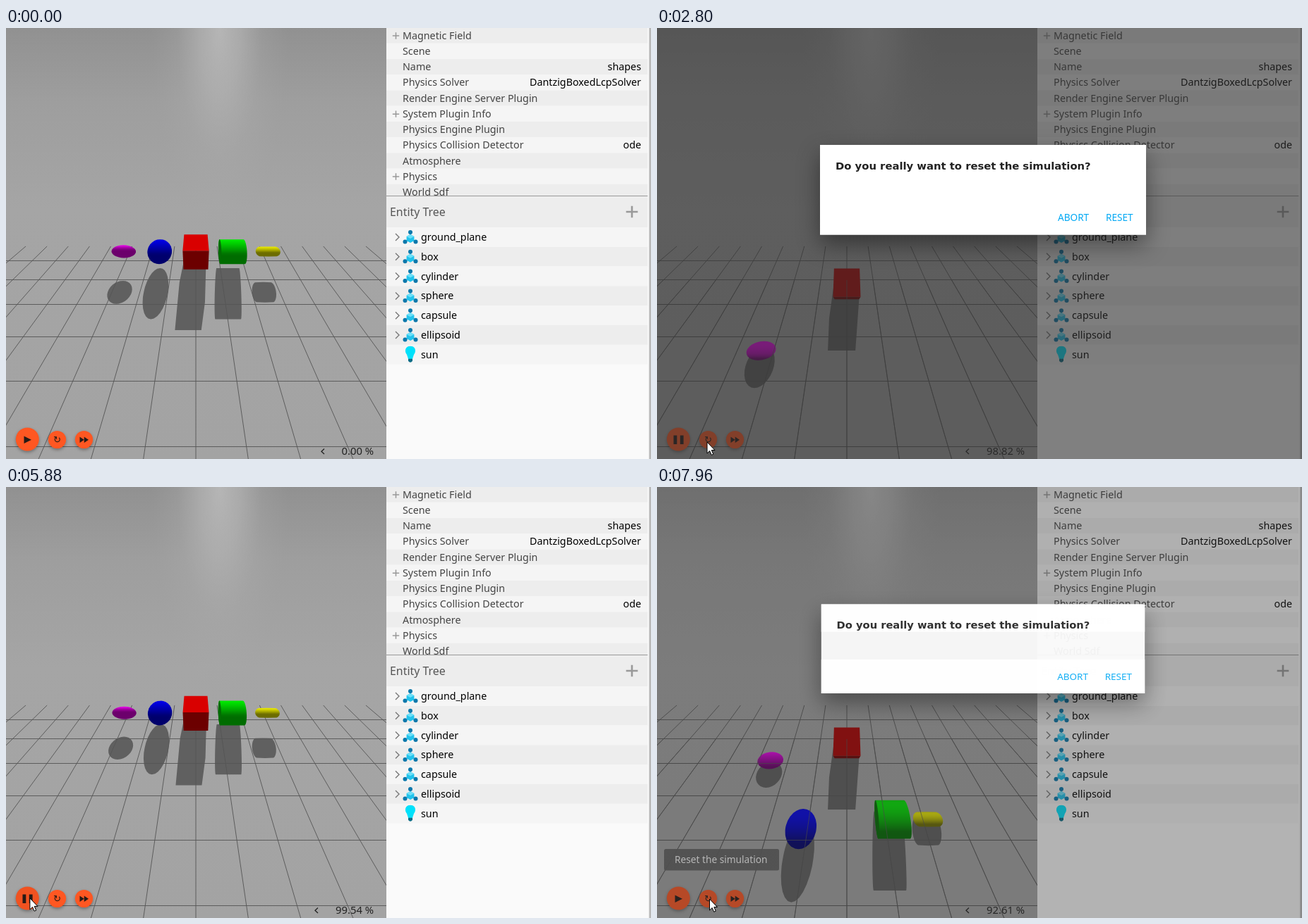
Recreate the animation shown at these times as an HTML page. Size 914x612 px, loop 8 s.

```html
<!DOCTYPE html>
<html lang="en">
<head>
<meta charset="utf-8">
<title>Simulation reset</title>
<style>
html, body { margin: 0; width: 100%; height: 100%; overflow: hidden; background: #fafafa; }
svg { display: block; width: 100vw; height: 100vh; }
text { font: 14.3px "Noto Sans", "Open Sans", sans-serif; fill: #444; white-space: pre; }
.value { fill: #000; }
.end { text-anchor: end; }
.head { font-size: 15.9px; fill: #555; }
.rate { font-size: 14.8px; fill: #222; }
.tip { font-size: 13.7px; fill: #fff; }
.title { font: bold 14.8px "DejaVu Sans", sans-serif; fill: #222; }
.action { font-size: 13.6px; fill: #03a9f4; }
.glyph { font: 13px "DejaVu Sans", sans-serif; fill: #261a16; text-anchor: middle; }
.raised { filter: drop-shadow(0 2px 2px rgba(0,0,0,.32)); }
#sheet { filter: drop-shadow(0 14px 16px rgba(0,0,0,.42)); }
</style>
</head>
<body>
<svg viewBox="0 0 914 612" preserveAspectRatio="none">
  <defs>
    <linearGradient id="ground" x2="0" y2="1">
      <stop offset="0" stop-color="#919191"/><stop offset=".17" stop-color="#9e9e9e"/>
      <stop offset=".42" stop-color="#a5a5a5"/><stop offset="1" stop-color="#a3a3a3"/>
    </linearGradient>
    <radialGradient id="glow">
      <stop offset="0" stop-color="#bcbcbc"/><stop offset=".5" stop-color="#b2b2b2" stop-opacity=".75"/>
      <stop offset="1" stop-color="#a8a8a8" stop-opacity="0"/>
    </radialGradient>
    <clipPath id="sunk"><rect y="358" width="539" height="254"/></clipPath>
    <path id="lines" fill="none" stroke="#555" stroke-width=".9"/>
  </defs>
  <rect width="539" height="612" fill="url(#ground)"/>
  <ellipse cx="303" cy="0" rx="98" ry="290" fill="url(#glow)" opacity=".4"/>
  <ellipse cx="303" cy="0" rx="60" ry="192" fill="url(#glow)" opacity=".75"/>
  <path id="shadows" fill="#606060"/>
  <use href="#lines"/>
  <g id="bodies"></g>
  <use id="over" href="#lines" clip-path="url(#sunk)"/>
  <g id="buttons"></g>
  <path id="chevron" d="M451 597.5L447 601.2L451 605" fill="none" stroke="#222" stroke-width="1.3"/>
  <text id="rate" class="rate end" y="606"></text>
  <g id="tooltip">
    <rect id="tipBox" x="10" height="30.5" rx="2.5" fill="#616161" fill-opacity=".93"/>
    <text id="tipText" class="tip" x="25"></text>
  </g>
  <g id="panel"></g>
  <rect id="dim" width="914" height="612" fill="#303030"/>
  <g id="dialog">
    <rect id="sheet" class="part" x="231" y="166" width="462" height="127.5" fill="#fff"/>
    <rect class="part" x="231" y="166" width="462" height="39.5" fill="#fff"/>
    <rect class="part" x="231" y="245" width="462" height="48.5" fill="#fff"/>
    <rect id="hover" x="628" y="251" width="58" height="36" rx="2"/>
    <text class="title part" x="253" y="201">Do you really want to reset the simulation?</text>
    <text class="action part" x="568" y="274">ABORT</text>
    <text class="action part" x="636" y="274">RESET</text>
  </g>
  <path id="cursor" d="M0 0V16L3.7 12.5L6.2 18.3L8.8 17.2L6.3 11.5H11Z" fill="#fff" stroke="#000"/>
</svg>
<script>
const LOOP = 8000;
const RUNS = [
  { shown: 640, start: 700, end: 4320, speed: .98, rate: n => 98.9 - 1.118 * Math.exp(-.5275 * n) },
  { shown: 5640, start: 5705, end: LOOP, stop: 7280, speed: .93, rate: n => 99.54 - 1.737 * Math.min(n, 5) ** .86 }
];
const PAUSE = 7320;
const DIALOGS = [[2420, 4343], [7873, Infinity]];
const { sin, cos, sqrt, min, max, PI } = Math;
const $ = id => document.getElementById(id);
const set = (el, attrs) => { for (const k in attrs) el.setAttribute(k, attrs[k]); };
const clamp = v => min(1, max(0, v));
const mix = (a, b, q) => a.map((v, i) => v + (b[i] - v) * q);
const smooth = q => q * q * (3 - 2 * q);
const range = n => Array.from({ length: n }, (_, i) => i);

// World in metres: [away from camera, right, up]. The ground slopes down towards the camera.
const G = 9.8, TILT = PI / 6, PITCH = .5, FOCAL = 269, EYE = 6;
const NORMAL = [-sin(TILT), 0, cos(TILT)], FOOT = [6, 0, -.5];
const SUN = [.5, .1, .9];
const dot = (a, b) => a[0] * b[0] + a[1] * b[1] + a[2] * b[2];
const sub = (a, b) => a.map((v, i) => v - b[i]);

function project([x, y, z]) {
  const h = EYE - z, depth = cos(PITCH) * x + sin(PITCH) * h;
  return [FOCAL + FOCAL * y / depth, 251 + FOCAL * (cos(PITCH) * h - sin(PITCH) * x) / depth];
}

function castShadow(p) {
  const s = dot(sub(p, FOOT), NORMAL) / dot(SUN, NORMAL);
  return p.map((v, i) => v - SUN[i] * s);
}

function hull(points) {
  const turn = (a, b, c) => (b[0] - a[0]) * (c[1] - a[1]) - (b[1] - a[1]) * (c[0] - a[0]);
  const chain = list => list.reduce((out, p) => {
    while (out.length > 1 && turn(out.at(-2), out.at(-1), p) <= 0) out.pop();
    return [...out, p];
  }, []).slice(0, -1);
  const sorted = points.slice().sort((a, b) => a[0] - b[0] || a[1] - b[1]);
  return [...chain(sorted), ...chain(sorted.reverse())];
}
const outline = points => 'M' + hull(points).map(p => p.map(v => v.toFixed(2)).join(' ')).join('L') + 'Z';

// Bodies of revolution: rings of [offset along the axis, share of the radius].
const arc = range(15).map(i => (i / 14 - .5) * PI);
const dome = (half, gap = 0) => arc.map(a => [half * sin(a) + gap * Math.sign(a), cos(a)]);
const BODIES = [
  { id: 'ellipsoid', y: -3, hue: [1, 0, 1], rings: dome(.5), rx: .2, rz: .3, rest: .28, grip: .3, drift: 0 },
  { id: 'sphere', y: -1.5, hue: [0, 0, 1], rings: dome(.5), rx: .5, rz: .5, rest: .5, grip: 5 / 7, drift: 0 },
  { id: 'box', y: 0, hue: [1, 0, 0] },
  { id: 'cylinder', y: 1.5, hue: [0, 1, 0], rings: [[-.5, 1], [.5, 1]], rx: .5, rz: .5, rest: .5, grip: 2 / 3, drift: 0, flat: true },
  { id: 'capsule', y: 3, hue: [1, 1, 0], rings: dome(.2, .3), rx: .2, rz: .2, rest: .2, grip: 2 / 3, drift: -.18 }
];
const FACES = {
  top: [[.5, .5, .5], [.5, -.5, .5], [-.5, .5, .5], [-.5, -.5, .5]],
  front: [[-.5, .5, .5], [-.5, -.5, .5], [-.5, .5, -.5], [-.5, -.5, -.5]],
  back: [[.5, .5, .5], [.5, -.5, .5], [.5, .5, -.5], [.5, -.5, -.5]]
};

// Free fall on to the slope, then rolling without slipping.
function roll(b, t) {
  const limit = (cos(TILT) - b.rest) / cos(TILT), hit = sqrt(2 * limit / G);
  const T = max(0, t - hit), pull = G * b.grip * sin(TILT);
  const d = min(7.5, pull * hit * T + pull * T * T / 2);
  const z = .5 - min(limit, G * t * t / 2) - d * sin(TILT);
  return { at: [6 - d * cos(TILT), b.y + b.drift * T, z], spin: d / b.rest };
}

// The box lands on its rear edge, tips on to the slope and slides to a halt.
function tip(t) {
  const hit = .207, q = clamp((t - hit) / .75);
  const z = .5 - G * min(t, hit) ** 2 / 2;
  return { at: mix([6, 0, z], [5.127, 0, -.427], q ** 1.4), spin: TILT * (1 - (1 - q) ** 2) };
}

const rotate = ([x, y, z], a) => [x * cos(a) - z * sin(a), y, x * sin(a) + z * cos(a)];
const place = (p, { at, spin }) => rotate(p, spin).map((v, i) => v + at[i]);

function tone(hue, normal) {
  const lit = max(0, dot(normal, SUN)) / sqrt(dot(SUN, SUN) * dot(normal, normal));
  return `rgb(${hue.map(c => Math.round(c * (108 + 125 * lit)))})`;
}

function ring(b, offset = 0, share = 1, n = 32) {
  return range(n).map(i => 2 * PI * i / n).map(a => [b.rx * share * cos(a), offset, b.rz * share * sin(a)]);
}

// Light along the visible half of the middle ring becomes a vertical gradient.
function shading(b, pose) {
  const seen = ring(b).map(p => {
    const at = place(p, pose), normal = rotate([p[0] / b.rx ** 2, 0, p[2] / b.rz ** 2], pose.spin);
    return { y: project(at)[1], color: tone(b.hue, normal), facing: dot(normal, sub([0, at[1], EYE], at)) };
  }).filter(s => s.facing > 0).sort((m, n) => m.y - n.y);
  const y1 = seen[0].y, y2 = seen.at(-1).y;
  const stops = seen.map(s => `<stop offset="${(s.y - y1) / (y2 - y1)}" stop-color="${s.color}"/>`);
  return `<linearGradient id="${b.id}" gradientUnits="userSpaceOnUse" x1="0" x2="0" y1="${y1}" y2="${y2}">${stops.join('')}</linearGradient>`;
}

function drawScene(t) {
  let shadows = '', bodies = '';
  const paint = (points, fill) => { bodies += `<path d="${outline(points.map(project))}" fill="${fill}"/>`; };
  for (const b of BODIES) {
    const pose = b.rings ? roll(b, t) : tip(t), put = p => place(p, pose);
    const points = (b.rings ? b.rings.flatMap(([o, s]) => ring(b, o, s)) : Object.values(FACES).flat()).map(put);
    shadows += outline(points.map(p => project(castShadow(p))));
    if (b.rings) {
      bodies += shading(b, pose);
      paint(points, `url(#${b.id})`);
      if (b.flat) paint(ring(b, -.5).map(put), tone(b.hue, [0, -1, 0]));
    } else {
      paint(FACES.front.map(put), tone(b.hue, rotate([-1, 0, 0], pose.spin)));
      paint(FACES.top.map(put), tone(b.hue, rotate([0, 0, 1], pose.spin)));
    }
  }
  set($('shadows'), { d: shadows });
  $('bodies').innerHTML = bodies;
  set($('over'), { opacity: t > .5 ? .75 : 0 });
}

function gridPath() {
  const reach = 6.9, near = .83;
  let d = '';
  for (let k = -10; k <= 10; k++) d += `M${project([reach, k, 0])}L${project([near, k, 0])}`;
  // The grid lies at the height of the drawn horizon rows, one metre apart.
  for (let m = 1; m <= 6; m++) d += `M0 ${Math.round(project([m, 0, 0])[1]) + .5}H539`;
  return d;
}

const plus = (x, y, r, w) => `<path d="M${x - r} ${y}H${x + r}M${x} ${y - r}V${y + r}" stroke="#999" stroke-width="${w}"/>`;
const label = (x, y, str, cls = '') => `<text x="${x}" y="${y}" class="${cls}">${str}</text>`;
const band = (y, h, i) => `<rect x="539" y="${y}" width="370.5" height="${h}" fill="${i % 2 ? '#f5f5f5' : '#ededed'}"/>`;

function modelIcon(y) {
  const ends = [[573, y - 7], [565.5, y + 6.5], [580.5, y + 6.5]];
  return ends.map(([x, v]) => `<path d="M573 ${y + 2}L${x} ${v}" stroke="#0b78ab" stroke-width="1.6"/><circle cx="${x}" cy="${v}" r="3" fill="#0b78ab"/>`).join('') +
    `<path d="M573 ${y - 4}L578.4 ${y - 1}V${y + 5}L573 ${y + 8}L567.6 ${y + 5}V${y - 1}Z" fill="#22c3ec"/>` +
    `<path d="M573 ${y - 4}L578.4 ${y - 1}L573 ${y + 2}L567.6 ${y - 1}Z" fill="#6fe0f8"/>`;
}

const bulbIcon = y => `<path d="M570 ${y + 4}H576V${y + 9}Q573 ${y + 13} 570 ${y + 9}Z" fill="#0a6c86"/>` +
  `<path d="M573 ${y - 12}C581 ${y - 12} 581.5 ${y - 4} 578 ${y}L576 ${y + 6}H570L568 ${y}C564.5 ${y - 4} 565 ${y - 12} 573 ${y - 12}Z" fill="#00e1fb"/>`;

function panel() {
  const rows = ['+Magnetic Field', 'Scene', 'Name|shapes', 'Physics Solver|DantzigBoxedLcpSolver',
    'Render Engine Server Plugin', '+System Plugin Info', 'Physics Engine Plugin',
    'Physics Collision Detector|ode', 'Atmosphere', '+Physics', 'World Sdf'];
  const items = ['ground_plane', 'box', 'cylinder', 'sphere', 'capsule', 'ellipsoid', 'sun'];
  let out = '<rect x="539" width="375" height="612" fill="#fafafa"/>';
  rows.forEach((row, i) => {
    const y = 10.7 + i * 22.23, [name, value] = row.replace('+', '').split('|');
    out += band(y - 11.1, 22.23, i) + label(562, y + 5, name);
    if (row[0] === '+') out += plus(552.5, y + .3, 4.7, 1.5);
    if (value) out += label(900, y + 5, value, 'value end');
  });
  out += band(238, 45, 0) + '<path d="M539 238.5H909.5" stroke="#999"/>' +
    label(544, 267, 'Entity Tree', 'head') + plus(887, 261, 8.3, 2.6);
  items.forEach((name, i) => {
    const y = 297 + i * 27.8;
    out += band(y - 14, 27.8, i + 1) + label(588, y + 5, name, 'value');
    out += name === 'sun' ? bulbIcon(y)
      : modelIcon(y) + `<path d="M552 ${y - 5}L557 ${y}L552 ${y + 5}" fill="none" stroke="#777" stroke-width="1.4"/>`;
  });
  return out + '<rect x="909.5" width="1.8" height="612" fill="#f8f8f8"/><rect x="911.3" width="2.7" height="612" fill="#b9b9b9"/>';
}

const ICONS = {
  play: 'M25.5 579.5L36 584.7L25.5 590Z',
  pause: 'M23.5 578.5H28.3V591H23.5ZM32.8 578.5H37.6V591H32.8Z',
  skip: 'M104.5 580.5L110.7 584.7L104.5 589ZM110.7 580.5L117 584.7L110.7 589Z'
};
const BUTTONS = [[30.3, 584, 16.5], [72.5, 584.5, 12.6], [110.5, 584.5, 12.6]];

function drawButtons(T, playing, cursor) {
  const press = T >= 320 && T < 640 ? .06 * clamp((T - 280) / 120) : 0;
  const modal = DIALOGS.some(([a, b]) => T >= a && T < b);
  $('buttons').innerHTML = BUTTONS.map(([x, y, r], i) => {
    const over = cursor && !modal && Math.hypot(cursor[0] - x, cursor[1] - y) < r;
    const tint = over ? .06 : i ? 0 : press;
    return `<circle class="raised" cx="${x}" cy="${y}" r="${r}" fill="#ff5722"/><circle cx="${x}" cy="${y}" r="${r}" opacity="${tint}"/>`;
  }).join('') + `<path d="${playing ? ICONS.pause : ICONS.play}${ICONS.skip}" fill="#261a16"/>` +
    label(72.5, 589, '↻', 'glyph');
}

function drawRate(T, run) {
  const age = run ? T - run.shown : 0;
  const rate = run ? run.rate(Math.floor(age / 400)) : 0;
  // The row re-centres one tick after the wider number arrives.
  const late = run && age < 40;
  $('rate').textContent = rate.toFixed(2) + ' %';
  set($('rate'), { x: late ? 530 : 521 });
  set($('chevron'), { transform: `translate(${run && !late ? -9 : 0} 0)` });
}

const TRACK = [[1880, 112, 616], [2200, 71, 588], [2960, 71, 588], [3600, 716, 237], [3880, 667, 270],
  [4690, 667, 270], [5000, 190, 571], [5230, 190, 571], [5400, 2, 594], [5520, 34, 584], [7320, 33, 583], [7560, 74.5, 585]];

function cursorAt(T) {
  const i = TRACK.findIndex(k => k[0] > T);
  if (i === 0) return null;
  if (i < 0) return TRACK.at(-1).slice(1);
  const a = TRACK[i - 1], b = TRACK[i];
  return mix(a, b, smooth((T - a[0]) / (b[0] - a[0]))).slice(1);
}

function drawTooltip(T) {
  const reset = T >= 7600, fade = (a, b) => clamp((T - a) / 120) * clamp((b - T) / 120);
  const y = reset ? 514 : 509.3;
  $('tipText').textContent = reset ? 'Reset the simulation' : 'Pause the simulation';
  set($('tipText'), { y: y + 19.5 });
  set($('tipBox'), { y, width: reset ? 163 : 165 });
  set($('tooltip'), { opacity: reset ? fade(7660, 9000) : fade(6560, 7440) });
}

function drawDialog(T) {
  const span = DIALOGS.find(([a, b]) => T >= a && T < b + 220);
  let scale = 1, alpha = 0, dim = 0;
  if (span) {
    const closing = T >= span[1], age = T - span[closing ? 1 : 0];
    const left = 1 - clamp(age / 150), zoom = .1 * (1 - clamp(age / 220)) ** 5;
    scale = closing ? .9 + zoom : 1 - zoom;
    alpha = closing ? left ** 3 : 1 - left ** 3;
    dim = .6 * (closing ? left : 1 - left);
  }
  set($('dim'), { opacity: dim });
  set($('dialog'), {
    transform: `translate(462 229.75) scale(${scale}) translate(-462 -229.75)`,
    visibility: alpha > 0 ? 'visible' : 'hidden'
  });
  document.querySelectorAll('.part').forEach(el => set(el, { opacity: alpha }));
  set($('hover'), { opacity: T > 3840 && T < 4600 ? alpha * (T < 4080 ? .05 : .12) : 0 });
}

function render(T) {
  const run = RUNS.find(r => T >= r.shown && T < r.end);
  const t = run ? max(0, min(T, run.stop || LOOP) - run.start) / 1000 * run.speed : 0;
  const cursor = cursorAt(T);
  drawScene(t);
  drawButtons(T, run && T < PAUSE, cursor);
  drawRate(T, run);
  drawTooltip(T);
  drawDialog(T);
  set($('cursor'), cursor
    ? { transform: `translate(${cursor})`, visibility: 'visible' }
    : { visibility: 'hidden' });
}

set($('lines'), { d: gridPath() });
$('panel').innerHTML = panel();
const origin = performance.now();
function tick() {
  render((performance.now() - origin) % LOOP);
  requestAnimationFrame(tick);
}
tick();
</script>
</body>
</html>
```
